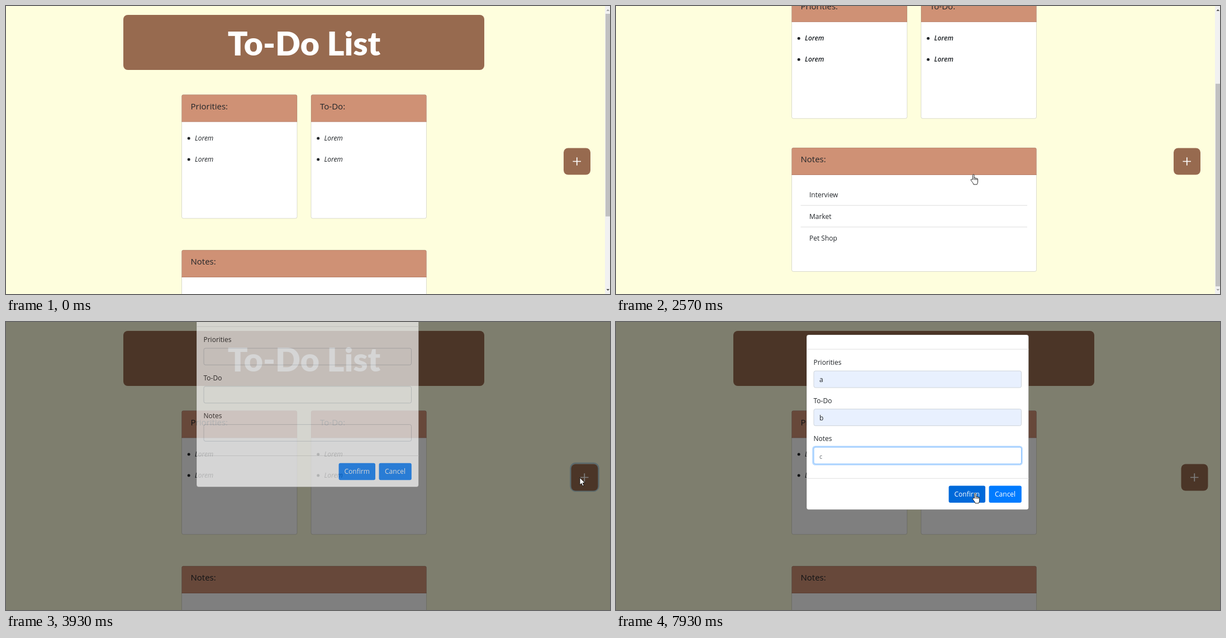
Animation, 1081 px wide and 518 px high, one loop 8000 ms. Source, as an HTML page:

```html
<!DOCTYPE html>
<html lang="en">
<head>
<meta charset="utf-8">
<title>To-Do List</title>
<style>
html, body { margin: 0; width: 100%; height: 100%; overflow: hidden; background: #fefedd; }
svg { display: block; width: 100%; height: 100%; font: 12px "Open Sans", "Noto Sans", sans-serif; }
text { fill: #212529; white-space: pre; }
.title { font: 900 59px Lato, sans-serif; fill: #fff; }
.head { font-size: 15px; font-weight: 500; }
.item { font-style: italic; font-weight: 500; }
.strong .item { font-weight: 600; }
.btn { fill: #fff; text-anchor: middle; }
.white { fill: #fff; }
.line { stroke: #dfdfdf; }
</style>
</head>
<body>
<svg id="stage" viewBox="0 0 1081 518"></svg>
<script>
const LOOP = 8000;
const stage = document.getElementById('stage');
const $ = id => document.getElementById(id);

const rect = (x, y, w, h, r, attrs) =>
  `<rect x="${x}" y="${y}" width="${w}" height="${h}" rx="${r}" ${attrs}/>`;
const text = (x, y, s, cls = '', attrs = '') =>
  `<text x="${x}" y="${y}" class="${cls}" ${attrs}>${s}</text>`;
const line = (x1, x2, y, cls = 'line') =>
  `<path d="M${x1} ${y}H${x2}" class="${cls}"/>`;

function card(id, x, y, w, title, body) {
  return `<g id="${id}"><g transform="translate(${x} ${y})">
    ${rect(0, 0, w, 222.5, 3, 'fill="#fff"')}
    <path d="M0 48.5V3Q0 0 3 0H${w - 3}Q${w} 0 ${w} 3V48.5Z" fill="#cf9175"/>
    <path d="M0 48.5H${w}" stroke="#b87d66"/>
    ${rect(0, 0, w, 222.5, 3, 'fill="none" stroke="#000" stroke-opacity=".14"')}
    ${text(16, 26, title, 'head')}${body}</g></g>`;
}

const bullets = [82.5, 120.5].map(y =>
  `<circle cx="12.7" cy="${y - 4}" r="2.5" fill="#212529"/>` + text(23.5, y, 'Lorem', 'item')).join('');
const notes = ['Interview', 'Market', 'Pet Shop'].map((s, i) =>
  text(31.5, 89 + i * 39, s) + (i < 2 ? line(16, 421.5, 103.5 + i * 39) : '')).join('');

const fieldY = i => 88 + i * 68.6;
const field = (label, i) => {
  const y = fieldY(i);
  return text(353.5, y - 11, label) +
    rect(352.5, y - 1.2, 374, 32.5, 4, `id="ring${i}" fill="none" stroke="#007bff" stroke-opacity=".28" stroke-width="2.6"`) +
    rect(354, y, 371.5, 30, 3, `id="box${i}"`) +
    text(364, y + 20.3, '', '', `id="val${i}"`) +
    `<path id="caret${i}" stroke="#333"/>`;
};

stage.innerHTML = `
<defs><filter id="soft" x="-20%" y="-20%" width="140%" height="150%">
  <feDropShadow dx="0" dy="1.5" stdDeviation="1.5" flood-opacity=".3"/></filter></defs>
<rect width="1081" height="518" fill="#fefedd"/>
<g id="page">
  ${rect(210, 16, 646, 99, 8, 'fill="#976a4f"')}
  ${text(533.5, 89, 'To-Do List', 'title', 'text-anchor="middle"')}
  ${card('prio', 314.5, 159.5, 206.5, 'Priorities:', bullets)}
  ${card('todo', 546, 159.5, 206.5, 'To-Do:', bullets)}
  ${card('note', 314.5, 439, 438, 'Notes:', notes)}
</g>
<g id="add">
  ${rect(997, 254, 50, 50, 9, 'id="addRing" fill="none" stroke="#9cc4d8" stroke-opacity=".75" stroke-width="2.6"')}
  ${rect(998, 255.5, 48, 48, 8, 'fill="#976a4f"')}
  <path d="M1014.5 279.5h14.5M1021.8 272.3v14.5" stroke="#fff" stroke-width="1.7"/>
</g>
<g id="bar">
  <rect x="1072" width="9" height="518" fill="#f1f1f1"/>
  <rect id="thumb" x="1073" width="8" height="364.5" fill="#c1c1c1"/>
  <path id="up" d="M1074.5 9h5.6l-2.8-3.2z"/>
  <path id="down" d="M1074.5 509h5.6l-2.8 3.2z"/>
</g>
<rect id="shade" width="1081" height="518"/>
<g id="modal">
  ${rect(341, 23, 397.5, 314.5, 4, 'fill="#fff" stroke="#000" stroke-opacity=".2"')}
  ${line(341, 738.5, 49)}${line(341, 738.5, 281.3)}
  ${['Priorities', 'To-Do', 'Notes'].map(field).join('')}
  ${rect(595.5, 294.5, 65.5, 30.5, 3, 'id="confirm"')}
  ${rect(667.5, 294.5, 58.3, 30.5, 3, 'fill="#007bff"')}
  ${text(628.2, 314.3, 'Confirm', 'btn')}${text(696.6, 314.3, 'Cancel', 'btn')}
  <g id="menu">
    ${rect(353.5, 119, 153.5, 41.5, 2, 'fill="#fff" filter="url(#soft)"')}
    <rect id="option" x="353.5" y="125" width="153.5" height="29" fill="#e6e7e8"/>
    ${text(363, 143.5, '', '', 'id="choice" font-size="10.5"')}
  </g>
</g>
<g id="cursor">
  <path id="arrow" d="M0 0V13l3-2.7 2 4.7 2.2-.9-2-4.6h4z" fill="#fff" stroke="#111" stroke-width=".9"/>
  <path id="hand" d="M3.5 9V1.5Q3.5 0 4.7 0T6 1.5V6Q8 5.2 8.4 6.7 10 6 10.6 7.4 12.5 7 12.5 9V13Q12.5 15.5 11 18H5Q4.5 16 2.5 13.5L.2 10.3Q-.3 8.4 1.6 8.8ZM6 6v4M8.4 6.8V10M10.6 7.5V10"
    transform="translate(-5)" fill="#fff" stroke="#111" stroke-width=".9"/>
  <path id="beam" d="M-2.5-6.5H2.5M0-6.5V6.5M-2.5 6.5H2.5" stroke="#222" fill="none"/>
</g>`;

// Pointer stops: time, x, y
const route = [
  [180, 899, 380], [260, 690, 345], [420, 449, 467], [720, 449, 467], [1000, 452, 288],
  [1460, 452, 288], [1540, 440, 270], [1760, 430, 110], [1900, 430, 100], [2140, 640, 110],
  [2400, 640, 296], [2570, 640, 303], [2640, 660, 303], [2840, 864, 302], [3170, 864, 302],
  [3560, 1024, 278], [3780, 1027, 280], [4000, 1027, 280], [4700, 452, 104], [5260, 452, 104],
  [5420, 448, 140], [5600, 448, 140], [5800, 450, 172], [6060, 450, 172], [6300, 448, 208],
  [6480, 448, 208], [6720, 450, 225], [6890, 450, 225], [6990, 450, 241], [7300, 450, 241],
  [7650, 650, 320], [7720, 650, 320], [7900, 643, 308], [8000, 643, 308]
];
const hovers = {
  prio: [[1680, 1990]],
  todo: [[250, 340], [2020, 2240]],
  note: [[370, 1600], [2330, 2730]]
};

const clamp = v => Math.max(0, Math.min(1, v));
const span = (t, a, b) => clamp((t - a) / (b - a));
const smooth = p => p * p * (3 - 2 * p);
const within = (t, a, b) => t >= a && t < b;
const set = (id, attrs) => {
  for (const k in attrs) $(id).setAttribute(k, attrs[k]);
};
const show = (id, on) => set(id, { visibility: on ? 'inherit' : 'hidden' });

function pointer(t) {
  const i = route.findIndex(p => p[0] > t);
  if (i < 1) return i < 0 ? route.at(-1).slice(1) : route[0].slice(1);
  const [t0, x0, y0] = route[i - 1], [t1, x1, y1] = route[i];
  const p = smooth(span(t, t0, t1));
  return [x0 + (x1 - x0) * p, y0 + (y1 - y0) * p];
}

function drawField(t, i, focus, blur, preview, fill) {
  const ring = span(t, focus, focus + 120) * (1 - span(t, blur, blur + 100));
  const value = t >= preview ? 'abc'[i] : '';
  const auto = i < 2 && value;
  set('ring' + i, { opacity: ring });
  set('box' + i, { fill: auto ? '#e8f0fe' : '#fff', stroke: ring > .5 ? '#80bdff' : '#ced4da' });
  $('val' + i).textContent = value;
  $('val' + i).style.cssText = t >= fill ? 'font-size:12px' : 'font-size:10.8px;fill:#666b72';
  const x = value && t >= preview ? 371.5 : 364.5;
  set('caret' + i, { d: `M${x} ${fieldY(i) + 8}v15` });
  show('caret' + i, within(t, focus, blur) && (t - focus) % 1000 < 500 && !(i < 2 && within(t, preview, fill)));
}

function draw(t) {
  const scroll = 179.7 * (smooth(span(t, 720, 1000)) - .88 * smooth(span(t, 2860, 3090)) - .12 * span(t, 3150, 3240));
  set('page', { transform: `translate(0 ${-scroll})`, class: within(t, 720, 3500) ? 'strong' : '' });
  let hand = t >= 7780 || within(t, 3460, 3660);
  for (const id in hovers) {
    let lift = 0;
    for (const [a, b] of hovers[id]) {
      lift += 4.3 * (span(t, a, a + 100) - span(t, b, b + 100));
      hand = hand || within(t, a, b);
    }
    set(id, { transform: `translate(0 ${-lift})` });
  }

  set('thumb', { y: 14 + scroll * .7 });
  set('up', { fill: scroll > 1 ? '#505050' : '#a3a3a3' });
  set('down', { fill: scroll < 179 ? '#505050' : '#a3a3a3' });
  const open = t >= 3670;
  show('bar', !open);
  set('add', { transform: `translate(${open ? 13.5 : 0} 0)` });
  show('addRing', within(t, 3640, 4900));
  set('shade', { opacity: .5 * span(t, 3670, 3820) });

  const enter = span(t, 3830, 4130);
  set('modal', {
    opacity: span(t, 3830, 3980),
    transform: `translate(0 ${-82 * (1 - enter) ** 1.7})`
  });
  drawField(t, 0, 4900, 5810, 5400, 5600);
  drawField(t, 1, 5810, 6990, 6270, 6480);
  drawField(t, 2, 6990, 9000, 7200, 9000);
  set('confirm', { fill: t >= 7780 ? '#0069d9' : '#007bff' });

  const second = t >= 5900;
  show('menu', within(t, 5240, 5600) || within(t, 5980, 6480));
  set('menu', { transform: `translate(0 ${second ? 68.6 : 0})` });
  $('choice').textContent = second ? 'b' : 'a';
  show('option', within(t, 5380, 5600) || within(t, 6250, 6480));

  const [x, y] = pointer(t);
  const beam = t > 4600 && [0, 1, 2].some(i => within(y, fieldY(i), fieldY(i) + 30) && within(x, 354, 725)) &&
    !within(t, 5380, 5600) && !within(t, 6250, 6480);
  set('cursor', { transform: `translate(${x} ${y})` });
  show('cursor', t >= 180);
  show('hand', hand);
  show('beam', beam && !hand);
  show('arrow', !beam && !hand);
}

const start = performance.now();
function tick(now) {
  draw(Math.max(0, now - start) % LOOP);
  requestAnimationFrame(tick);
}
draw(0);
requestAnimationFrame(tick);
</script>
</body>
</html>
```
